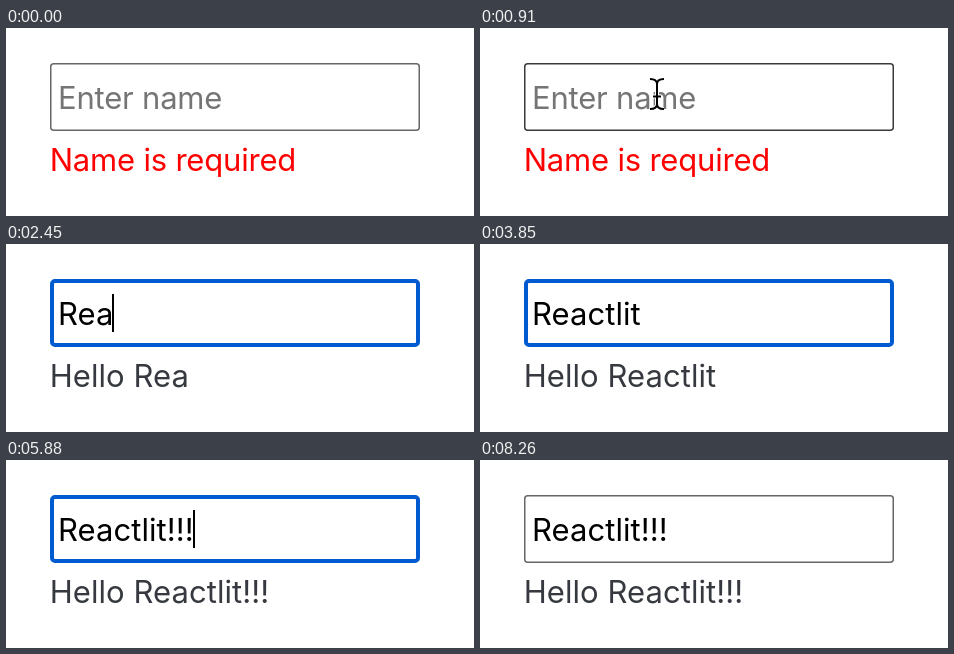
Write an HTML page with a canvas that moves like this. It is 468 px wide and 188 px high and loops after 8.33 s.

```html
<!DOCTYPE html>
<html lang="en">
<head>
<meta charset="utf-8">
<title>Name input</title>
<style>
  html, body { margin: 0; width: 100%; height: 100%; overflow: hidden; background: #fff; }
  canvas { display: block; }
</style>
</head>
<body>
<canvas id="stage" width="468" height="188"></canvas>
<script>
const ctx = document.getElementById('stage').getContext('2d');
const LOOP = 8330;
const HALF_BLINK = 525;
const FOCUS = 1225;
const BLUR = 8120;
const NAME = 'Reactlit!!!';
// One time per typed character of NAME.
const KEY_TIMES = [2030, 2240, 2450, 2590, 2800, 3150, 3220, 3325, 3990, 4165, 4830];
const POINTER = { start: 70, end: 840, from: [250, 192], to: [177, 66] };

function drawText(text, x, baseline, color) {
  ctx.fillStyle = color;
  ctx.fillText(text, x, baseline);
}

function drawBox(color, width) {
  ctx.strokeStyle = color;
  ctx.lineWidth = width;
  ctx.beginPath();
  ctx.roundRect(44 + width / 2, 35 + width / 2, 370 - width, 68 - width, 3);
  ctx.stroke();
}

function strokeWithHalo(path, width) {
  ctx.strokeStyle = '#fff';
  ctx.lineWidth = width + 2;
  ctx.stroke(path);
  ctx.strokeStyle = '#000';
  ctx.lineWidth = width;
  ctx.stroke(path);
}

const beam = new Path2D('M-7-15Q0-15 0-10Q0-15 7-15M0-11V11M-7 15Q0 15 0 10Q0 15 7 15M-4 2.5H4');
const arrow = new Path2D('M0 0V27L6 21L11 32L16 30L11 19H20Z');

function pointerAt(t) {
  const { start, end, from, to } = POINTER;
  const p = Math.max(0, Math.min(1, (t - start) / (end - start)));
  const eased = 1 - (1 - p) ** 2;
  return from.map((v, i) => v + (to[i] - v) * eased);
}

function drawPointer(x, y) {
  const overText = y < 103 || (y > 114 && y < 152 && x < 289);
  ctx.save();
  ctx.translate(x, y);
  if (overText) {
    strokeWithHalo(beam, 2);
  } else {
    strokeWithHalo(arrow, 2);
    ctx.fillStyle = '#000';
    ctx.fill(arrow);
  }
  ctx.restore();
}

function draw(now) {
  const t = now % LOOP;
  const typed = KEY_TIMES.filter(time => time <= t).length;
  const value = NAME.slice(0, typed);
  const focused = t >= FOCUS && t < BLUR;
  const [x, y] = pointerAt(t);
  const pointerShown = t >= POINTER.start && !typed;
  const hovered = pointerShown && y < 103;

  ctx.fillStyle = '#fff';
  ctx.fillRect(0, 0, 468, 188);
  ctx.font = '31px Inter, "Open Sans", sans-serif';
  ctx.letterSpacing = value ? '0.06px' : '-0.2px';

  if (focused) drawBox('#005bd0', 4);
  else drawBox(hovered ? '#3a3a3a' : '#666', 1.5);
  drawText(value || 'Enter name', 52, 81, value ? '#000' : '#757575');
  drawText(value ? 'Hello ' + value : 'Name is required', 43.7, 143, value ? '#36393f' : '#f00');

  // Each key press restarts the blink with a visible caret.
  const blinkStart = typed ? KEY_TIMES[typed - 1] : FOCUS;
  if (focused && (t - blinkStart) % (2 * HALF_BLINK) < HALF_BLINK) {
    ctx.fillStyle = '#000';
    ctx.fillRect(Math.round(52 + ctx.measureText(value).width) - 1, 50, 2, 38);
  }
  if (pointerShown) drawPointer(x, y);
}

function frame() {
  draw(performance.now());
  requestAnimationFrame(frame);
}
frame();
</script>
</body>
</html>
```
